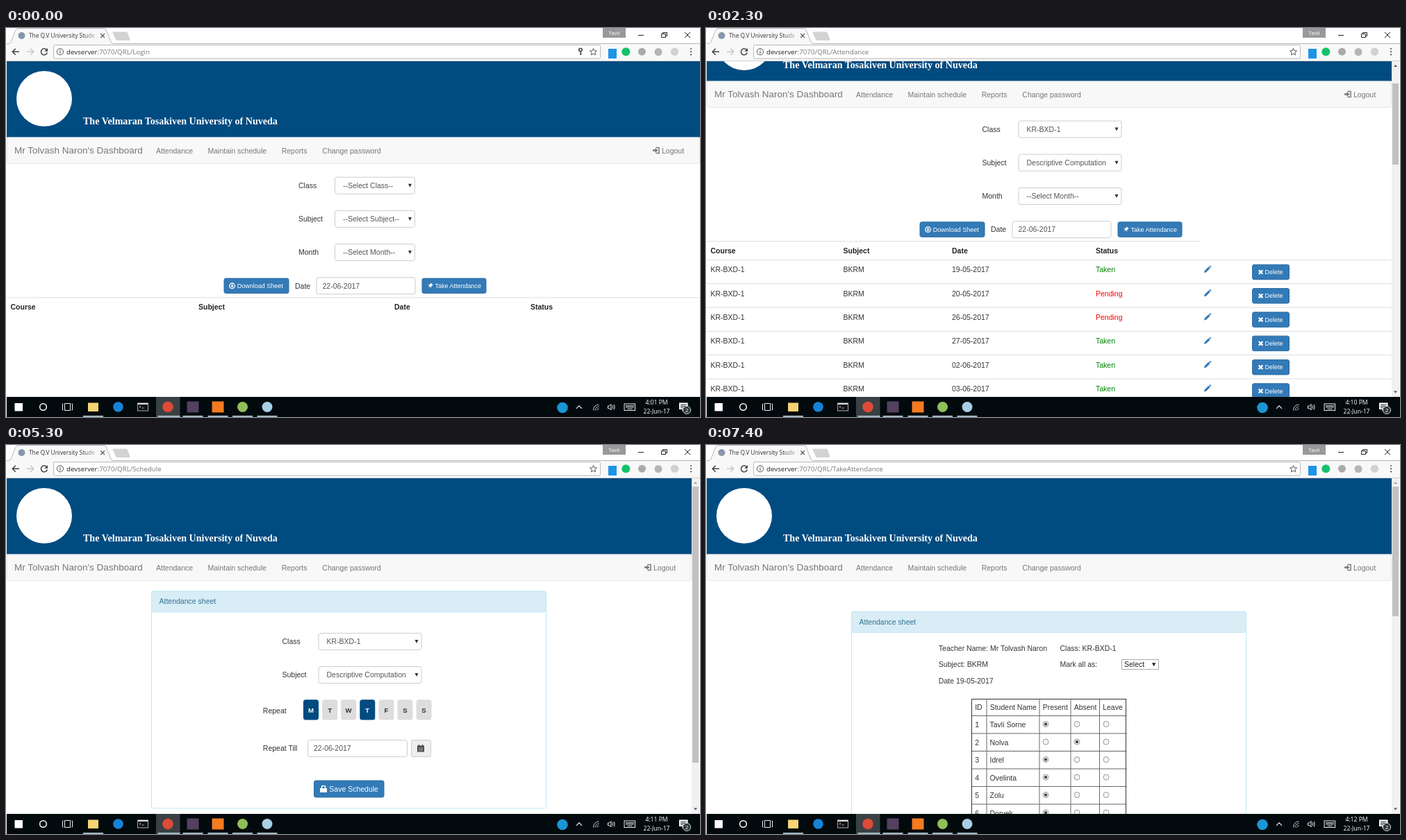
An HTML page for the animation above (8000 ms loop, 999 by 561 pixels).

```html
<!DOCTYPE html>
<html lang="en">
<head>
<meta charset="utf-8">
<title>Attendance dashboard</title>
<style>
html, body { margin: 0; width: 100%; height: 100%; overflow: hidden; background: #fff; }
svg { display: block; width: 999px; height: 561px; font: 10.5px "Liberation Sans", Arial, sans-serif; }
text { white-space: pre; }
.ui { font-family: "Open Sans", "Noto Sans", sans-serif; }
.scene { visibility: hidden; animation: 8s step-end infinite; }
#home { animation-name: home; }
#list { animation-name: list; }
#plan { animation-name: plan; }
#sheet { animation-name: sheet; }
@keyframes home { 0% { visibility: visible; } 6.25%, 100% { visibility: hidden; } }
@keyframes list { 0% { visibility: hidden; } 6.25% { visibility: visible; } 43.75%, 100% { visibility: hidden; } }
@keyframes plan { 0% { visibility: hidden; } 43.75% { visibility: visible; } 81.25%, 100% { visibility: hidden; } }
@keyframes sheet { 0% { visibility: hidden; } 81.25%, 100% { visibility: visible; } }
</style>
</head>
<body>
<svg id="stage" viewBox="0 0 999 561"></svg>
<script>
const NAVY = '#004b80', BLUE = '#337ab7', EDGE = '#2e6da4';
const TEACHER = 'Mr Tolvash Naron', GROUP = 'KR-BXD-1', CODE = 'BKRM', COURSE = 'Descriptive Computation';

// Drawing helpers
const text = (x, y, s, fill = '#333', more = '') => `<text x="${x}" y="${y}" fill="${fill}" ${more}>${s}</text>`;
const mid = (x, y, s, fill, more) => text(x, y + 3.8, s, fill, more);
const bold = (x, y, s, more = '') => text(x, y, s, '#222', `font-weight="bold" ${more}`);
const ui = (x, y, s, size, fill, more = '') => text(x, y, s, fill, `class="ui" font-size="${size}" ${more}`);
const box = (x, y, w, h, fill, edge = 'none', r = 0) =>
  `<rect x="${x}" y="${y}" width="${w}" height="${h}" rx="${r}" fill="${fill}" stroke="${edge}"/>`;
const disc = (x, y, r, fill, edge = 'none', w = 1) =>
  `<circle cx="${x}" cy="${y}" r="${r}" fill="${fill}" stroke="${edge}" stroke-width="${w}"/>`;
const line = (d, stroke, w = 1) => `<path d="${d}" fill="none" stroke="${stroke}" stroke-width="${w}"/>`;
const shape = (d, fill) => `<path d="${d}" fill="${fill}"/>`;
const at = (x, y, s) => `<g transform="translate(${x} ${y})">${s}</g>`;

// Icons, centred on 0,0
const icon = {
  down: disc(0, 0, 3.8, 'none', '#fff', 1.3) + shape('M-.8-2.4H.8V0H2.4L0 2.5-2.4 0H-.8Z', '#fff'),
  pin: shape('M1-4.2 4.2-1 3.2-.6 1.6 1 1.4 3-.6 1-4.4 4.4-1 .6-3-1.4-1-1.6.6-3.2Z', '#fff'),
  cross: line('M-2.8-2.8 2.8 2.8M2.8-2.8-2.8 2.8', '#fff', 2.3),
  pencil: shape('M-5 5-4.2 2 1.5-3.7 3.7-1.5-2 4.2ZM2.2-4.4 3.2-5.2Q4-5.4 4.8-4.5 5.5-3.8 5-3L4.3-2.3Z', BLUE),
  exit: line('M-.5-4H4V4H-.5', '#777', 1.5) + shape('M-5-1.2H-1.5V-3.5L2.4 0-1.5 3.5V1.2H-5Z', '#777'),
  bag: shape('M-5-1H5V5H-5Z', '#fff') + line('M-2.5-1V-3Q-2.5-4.5 0-4.5T2.5-3V-1', '#fff', 1.5),
  calendar: box(-5, -4, 10, 9, '#444') + line('M-4-1.2H4M-4 1H4M-4 3.2H4M-2-1V4M0-1V4M2-1V4', '#bbb', .5) +
    line('M-2.5-5.5V-3M2.5-5.5V-3', '#444', 1.4)
};

// Form parts; y is the vertical centre
const field = (x, y, w, s) => box(x + .5, y - 12, w - 1, 24, '#fff', '#ccc', 3) + mid(x + 9, y, s, '#555');
const select = (x, y, w, s) => box(x + .5, y - 12, w - 1, 24, '#fff', '#ccc', 3) + mid(x + 12, y, s, '#555') +
  shape(`M${x + w - 10} ${y - 2.5}h5l-2.5 5Z`, '#333');
const button = (x, y, w, h, pic, px, tx, s, size = 9) =>
  box(x + .5, y - h / 2, w - 1, h, BLUE, EDGE, 2.5) + at(x + px, y, icon[pic]) +
  text(x + tx, y + size * .35, s, '#fff', `font-size="${size}"`);
const picker = (x, y, w, rows) => rows.map(([label, value], i) =>
  mid(x, y + i * 48.2, label) + select(x + 52, y + i * 48.2, w, value)).join('');
const tools = (x, y) => button(x, y, 94, 21.5, 'down', 12, 19.3, 'Download Sheet') + mid(x + 102.5, y, 'Date') +
  field(x + 133, y, 143, '22-06-2017') + button(x + 285, y, 93, 21.5, 'pin', 12, 19, 'Take Attendance');
const heads = (y, xs) => ['Course', 'Subject', 'Date', 'Status'].map((s, i) => bold(xs[i], y, s)).join('');
const panel = (y, h) => box(209.5, y + .5, 568, h, '#fff', '#bce8f1', 3) +
  box(209.5, y + .5, 568, 30, '#d9edf7', '#bce8f1', 3) + mid(220.5, y + 15, 'Attendance sheet', '#31708f');

function banner(right) {
  const links = [[216, 'Attendance'], [290.5, 'Maintain schedule'], [396.7, 'Reports'], [455.3, 'Change password']];
  return box(1, 48, right - 1, 109.5, NAVY) + disc(55, 102, 40, '#fff') +
    text(111, 139, 'The Velmaran Tosakiven University of Nuveda', '#fff',
      'font-family="Liberation Serif, Times, serif" font-weight="bold" font-size="14.05"') +
    box(1.5, 158, right - 2, 37.5, '#f8f8f8', '#e7e7e7', 2) +
    text(12, 181, `${TEACHER}'s Dashboard`, '#777', 'font-size="13.5"') +
    links.map(([x, s]) => text(x, 180.7, s, '#777')).join('') +
    at(right - 63, 176.5, icon.exit) + text(right - 55, 180.7, 'Logout', '#777');
}

function scrollbar(top, bottom) {
  return box(987, 48, 11, 484, '#f1f1f1') + box(988, top, 9, bottom - top, '#c1c1c1') +
    shape('M990 56h5l-2.5-3Z', top > 60 ? '#505050' : '#a3a3a3') + shape('M990 523.5h5l-2.5 3Z', '#505050');
}

function scene(id, page, clock, body) {
  const key = id === 'home' ? disc(827, 31.5, 2.2, 'none', '#555', 1.8) + line('M827 33.5V39M827 37.3h2', '#555', 1.5) : '';
  return `<g class="scene" id="${id}"><g clip-path="url(#view)">${body}</g>` +
    ui(87, 38, `devserver<tspan fill="#777">:7070/QRL/${page}</tspan>`, 9.75, '#222') + key +
    ui(936.5, 542.5, clock + ' PM', 8.6, '#fff', 'text-anchor="middle"') + '</g>';
}

function home() {
  return banner(999) +
    picker(421, 227.2, 116, [['Class', '--Select Class--'], ['Subject', '--Select Subject--'], ['Month', '--Select Month--']]) +
    tools(313.5, 371.8) + line('M1 388.8H999', '#ddd') + heads(406.3, [6.5, 277, 559, 755]);
}

function list() {
  const days = ['19-05', '20-05', '26-05', '27-05', '02-06', '03-06'];
  const rows = days.map((day, i) => {
    const y = 348.5 + i * 34.3, late = i === 1 || i === 2;
    return line(`M1 ${y - 14}H987`, '#ddd') + mid(6.5, y, GROUP) + mid(197.5, y, CODE) + mid(354, y, day + '-2017') +
      mid(561, y, late ? 'Pending' : 'Taken', late ? '#f00' : '#008000') +
      at(722, y - .5, icon.pencil) + button(786, y + 3.5, 54, 21.5, 'cross', 12.5, 18.5, 'Delete');
  }).join('');
  return at(0, -81, banner(987)) +
    picker(397.5, 146, 149, [['Class', GROUP], ['Subject', COURSE], ['Month', '--Select Month--']]) +
    tools(307.5, 290.6) + line('M1 307.7H711', '#ddd') + heads(325.2, [6.5, 197.5, 354, 561]) + rows + scrollbar(80, 197);
}

function plan() {
  const days = [...'MTWTFSS'].map((d, i) => {
    const x = 428 + i * 27.1, on = i === 0 || i === 3;
    return box(x, 367.3, 22, 29.3, on ? NAVY : '#ddd', 'none', 3.5) +
      text(x + 11, 385.5, d, on ? '#fff' : '#333', 'font-weight="bold" font-size="9.7" text-anchor="middle"');
  }).join('');
  return banner(987) + panel(210.5, 313) + picker(397.5, 283.4, 149, [['Class', GROUP], ['Subject', COURSE]]) +
    mid(369.8, 383.5, 'Repeat') + days + mid(369.8, 437.6, 'Repeat Till') + field(434, 437.6, 144, '22-06-2017') +
    box(583.5, 425.6, 28, 24, '#eee', '#ccc', 2) + at(597, 437.6, icon.calendar) +
    button(443, 496, 101.5, 24, 'bag', 14, 22.3, 'Save Schedule', 10.5) + scrollbar(60, 458);
}

function sheet() {
  const cols = [382.5, 404, 480, 525, 566.5, 605], top = 366;
  const radio = (x, y, on) => disc(x, y, 4, '#f4f4f4', '#999') + (on ? disc(x, y, 2.2, '#444') : '');
  const titles = ['ID', 'Student Name', 'Present', 'Absent', 'Leave'].map((s, i) => mid(cols[i] + 4.7, 378.3, s)).join('');
  const rows = ['Tavli Sorne', 'Nolva', 'Idrel', 'Ovelinta', 'Zolu', 'Dorvek'].map((name, i) => {
    const y = 403.4 + i * 25.5, mark = i === 1 ? 1 : 0;
    return line(`M382 ${y - 12.9}H605.5`, '#666') + mid(387.2, y, i + 1) + mid(408.5, y, name) +
      [489, 534, 576].map((x, j) => radio(x, y - .8, j === mark)).join('');
  }).join('');
  return banner(987) + panel(239.8, 320) + mid(334.8, 293, `Teacher Name: ${TEACHER}`) + mid(509.5, 293, `Class: ${GROUP}`) +
    mid(334.8, 316.5, `Subject: ${CODE}`) + mid(509.5, 316.5, 'Mark all as:') + mid(334.8, 340, 'Date 19-05-2017') +
    box(598.5, 309.5, 53, 14, '#fff', '#a9a9a9') + mid(602, 316.5, 'Select', '#222') + shape('M642 314.2h5.4l-2.7 5Z', '#222') +
    titles + rows + line(`M382 ${top + .5}H605.5` + cols.slice(1, 5).map(x => `M${x} ${top}V540`).join(''), '#666') +
    line(`M382.5 540V${top + .5}H604.5V540`, '#333') + scrollbar(60, 247);
}

function browser() {
  const tab = 'M1 22.5H5C8 21 12 5 15 2Q16 .5 18 .5H140Q143 .5 144 2.5L151 20Q152 22.5 155 22.5H999';
  return box(1, 22, 998, 26, '#f8f8f8') + shape(tab, '#f8f8f8') + line(tab, '#b5b5b5') +
    shape('M153 5.5H173Q174.5 5.5 175 7L178.5 16.5Q179 18 177 18H160.5Q158.5 18 158 16.5Z', '#d3d3d3') +
    disc(22.5, 11, 5, '#8796ab') + ui(33, 14, 'The Q.V University Stude', 8.35, 'url(#fade)') +
    line('M136.2 8.2 142 14M142 8.2 136.2 14', '#555', 1.2) +
    box(859, 0, 33, 14, '#999') + ui(875.5, 9.5, 'Tavli', 8, '#fff', 'text-anchor="middle"') +
    line('M910 10.5H918M943.5 8.5H949.5V13.5H943.5ZM945.5 8V6.5H951.5V11.5H950M977 6 985 14M985 6 977 14', '#222') +
    line('M19 34.2H9.5M13.8 29.7 9.3 34.2 13.8 38.7', '#444', 1.5) +
    line('M30 34.2H39.5M35.2 29.7 39.7 34.2 35.2 38.7', '#c8c8c8', 1.5) +
    line('M58.4 31.4A4.5 4.5 0 1 0 59.3 35.5', '#444', 1.5) + shape('M60 29V33.7H55.3Z', '#444') +
    box(68.5, 24.5, 787, 19.5, '#fff', '#b8b8b8', 2) +
    disc(78, 34.2, 4.6, 'none', '#555') + line('M78 33.5V36.8M78 31.3V32.5', '#555', 1.2) +
    line('M845.5 29.4 846.9 32.7 850.5 33 847.8 35.4 848.6 38.9 845.5 37 842.4 38.9 843.2 35.4 840.5 33 844.1 32.7Z', '#555') +
    box(867, 30, 12, 14, '#1c94e8') + disc(892.3, 34.2, 6, '#15c26b') + disc(915.5, 34.2, 5.5, '#aaa') +
    disc(939, 34.5, 5.5, '#b5b5b5') + disc(962.5, 34.2, 5.8, '#d2d2d2') +
    [30, 34.2, 38.4].map(y => disc(986, y, 1.1, '#555')).join('') + line('M1 47.5H999', '#d0d0d0');
}

function taskbar() {
  const running = [125.5, 233, 269, 305, 340.5, 376];
  return box(1, 532, 998, 29, '#020a0d') + box(216, 532, 34.5, 29, '#3a4144') +
    running.map(x => box(x - 14.5, 559, x === 233 ? 32 : 29, 2, '#9fb9c4')).join('') +
    box(12.5, 541, 11.5, 11.5, '#fff') + disc(53.5, 546.5, 4.8, 'none', '#fff', 1.5) +
    line('M84.5 541.5H92.5V551.5H84.5ZM82.5 542H81.5V551H82.5M94.5 542H95.5V551H94.5', '#eee') +
    box(118, 540.5, 15, 12.5, '#f6d374') + disc(161.5, 546.5, 7.3, '#1683d8') +
    box(189.5, 541, 15, 11, '#111', '#aaa') + line('M190 542H204', '#ddd', 2) + line('M192 545l2 1.3-2 1.3M195.5 548h3', '#ddd', .8) +
    disc(233, 546.5, 7.8, '#dd4b39') + box(260.5, 538.5, 17, 16, '#54405f') + box(296.5, 538.5, 17, 16, '#f47b20') +
    disc(340.5, 546.5, 7.5, '#8fbf58') + disc(376, 546.5, 7.5, '#a9cfe6') + disc(801, 547.5, 7.8, '#1a96d4') +
    line('M821 548.8 825 544.8 829 548.8', '#eee', 1.2) +
    line('M845.5 551.5A8 8 0 0 1 853.5 543M848 551.5A5.5 5.5 0 0 1 853.5 546M850.5 551.5A3 3 0 0 1 853.5 549', '#ccc') +
    line('M866.5 545H868.5L871 542.5V551L868.5 548.5H866.5ZM873 544.5Q874.5 546.8 873 549M875 543Q877.5 546.8 875 550.5', '#eee') +
    box(890, 542, 15.5, 9.5, 'none', '#eee') + line('M892 544.8H904M892 547H904', '#ddd', 1.2) + line('M894.5 549.3H901.5', '#ddd') +
    ui(936.5, 555.7, '22-Jun-17', 8.6, '#fff', 'text-anchor="middle"') +
    shape('M969 540.5H981.5V550H976L973.5 553V550H969Z', '#fff') + line('M971 543.3H979.5M971 545.5H979.5M971 547.7H976', '#020a0d', .9) +
    disc(980, 551, 5.6, '#30383b', '#ccc') + ui(980, 554, '2', 8, '#fff', 'text-anchor="middle"');
}

document.getElementById('stage').innerHTML =
  `<defs><clipPath id="view"><rect x="0" y="48" width="999" height="484"/></clipPath>
  <linearGradient id="fade" gradientUnits="userSpaceOnUse" x1="112" x2="131" y1="0" y2="0">
  <stop stop-color="#333"/><stop offset="1" stop-color="#333" stop-opacity=".15"/></linearGradient></defs>` +
  browser() + taskbar() +
  scene('home', 'Login', '4:01', home()) +
  scene('list', 'Attendance', '4:10', list()) +
  scene('plan', 'Schedule', '4:11', plan()) +
  scene('sheet', 'TakeAttendance', '4:12', sheet());
</script>
</body>
</html>
```
